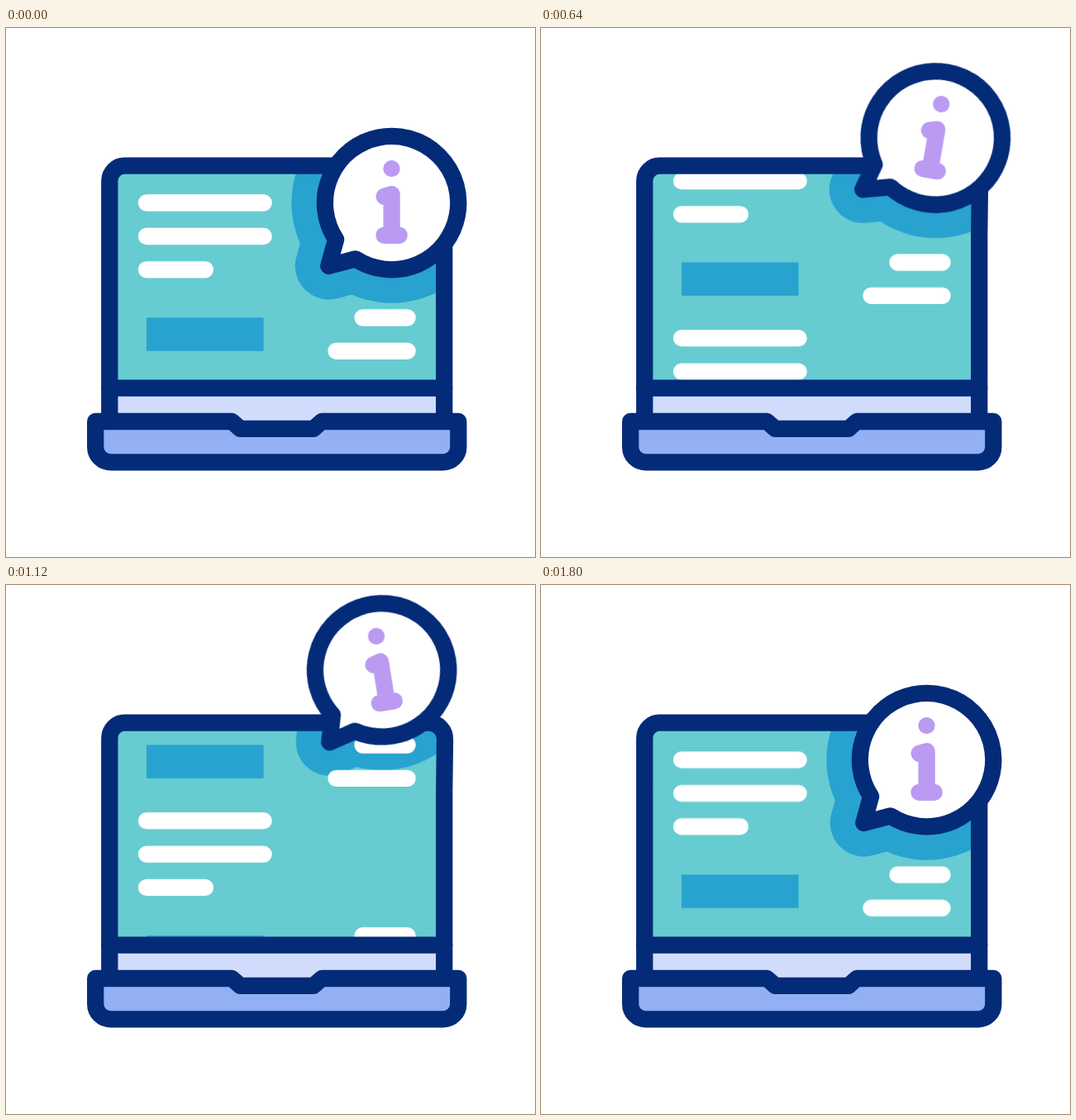
Animation of 640 by 640 pixels, one loop 1.82 s. Source, as an HTML page:

```html
<!DOCTYPE html>
<html lang="en">
<head>
<meta charset="utf-8">
<title>Laptop with info bubble</title>
<style>
  html, body { margin: 0; width: 100%; height: 100%; overflow: hidden; background: #fff; }
  svg { display: block; width: 100%; height: 100%; }

  .line { fill: none; stroke-width: 20.3; stroke-linecap: round; stroke-linejoin: round; }
  .navy { stroke: #032b78; }
  .white { stroke: #fff; }
  .purple { stroke: #bb9af2; }
  .shadow { fill: #28a2ce; stroke: #28a2ce; stroke-width: 81; stroke-linejoin: round; }

  /* The loop is 1800 ms of motion plus a 20 ms hold. */
  .scroll, .lift, .tilt {
    animation: 1820ms cubic-bezier(.33333, 0, .66667, 1) infinite;
  }
  .scroll { animation-name: scroll; }
  .lift { animation-name: lift; }
  .tilt { animation-name: tilt; transform-origin: 392.3px 281.6px; }

  @keyframes scroll {
    0% { transform: translateY(0); }
    98.9011%, 100% { transform: translateY(-230.6px); }
  }
  @keyframes lift {
    0%, 98.9011%, 100% { transform: translateY(0); }
    49.4505% { transform: translateY(-115.3px); }
  }
  @keyframes tilt {
    0%, 98.9011%, 100% { transform: rotate(0deg); }
    32.967% { transform: rotate(10deg); }
    65.934% { transform: rotate(-10deg); }
  }
</style>
</head>
<body>
<svg viewBox="0 0 640 640">
  <defs>
    <path id="balloon" d="M399.15 255.9A80.7 80.7 0 1 1 422.77 279.36L390.3 288Z"/>
    <path id="frame" d="M125.3 476V185A18.3 18.3 0 0 1 143.6 166.7H511.5A19.5 19.5 0 0 1 531 187L530.2 250V476"/>
    <g id="page">
      <path class="line white" d="M170 211.5H311.7M170 252H311.7M170 292.3H241M431.5 350.5H485.6M399.5 390.8H485.6"/>
      <rect x="170" y="350.4" width="141.6" height="40.4" fill="#28a2ce"/>
    </g>
    <clipPath id="screen"><path d="M125.3 435.6V185A18.3 18.3 0 0 1 143.6 166.7H511.5A19.5 19.5 0 0 1 531 187L530.2 250V435.6Z"/></clipPath>
  </defs>

  <use href="#frame" fill="#d1dcfd"/>
  <g clip-path="url(#screen)">
    <rect x="115" y="156" width="430" height="280" fill="#66ccd1"/>
    <g class="lift"><g class="tilt"><use href="#balloon" class="shadow"/></g></g>
    <g class="scroll">
      <use href="#page"/>
      <use href="#page" y="230.6"/>
    </g>
  </g>
  <use href="#frame" class="line navy"/>
  <path class="line navy" d="M125.3 435.6H530.2"/>
  <path class="line navy" style="fill:#92b0f3" d="M108.2 476H273.4L283.4 484.8H372L382 476H547.3V507A18.3 18.3 0 0 1 529 525.3H126.5A18.3 18.3 0 0 1 108.2 507Z"/>

  <g class="lift"><g class="tilt">
    <use href="#balloon" class="line navy" style="fill:#fff"/>
    <circle cx="466.5" cy="170.1" r="10.2" fill="#bb9af2"/>
    <path class="line purple" d="M457.6 203.8L466.6 201.2V250.8M457.5 250.8H475.7"/>
  </g></g>
</svg>
</body>
</html>
```
